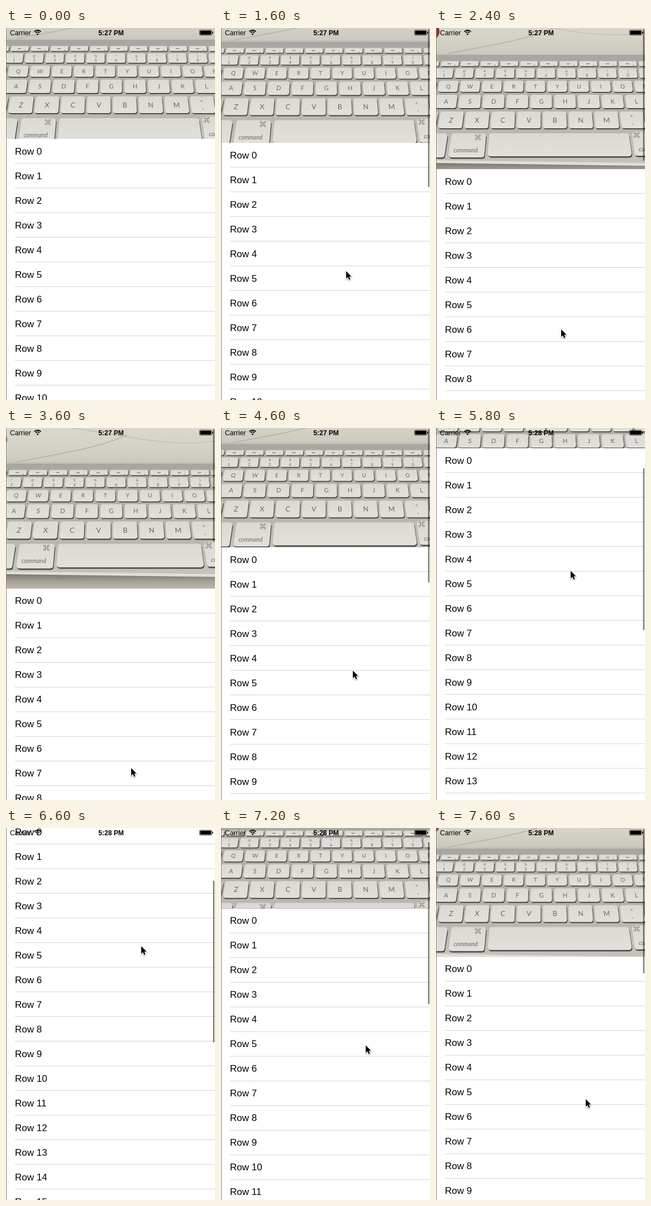
Animation, 374 px wide and 664 px high, one loop 7800 ms. Source, as an HTML page with a canvas:

```html
<!DOCTYPE html>
<html lang="en">
<head>
<meta charset="utf-8">
<title>Stretchy table header</title>
<style>
  html, body { margin: 0; width: 100%; height: 100%; overflow: hidden; background: #fff; }
  canvas { display: block; width: 374px; height: 664px; }
</style>
</head>
<body>
<canvas id="stage" width="374" height="664"></canvas>
<script>
const W = 374, HGT = 664, LOOP = 7800, STEP = 200;
const REST = 198, ROW = 44, PHOTO_H = 280;
const SANS = '"Liberation Sans", Arial, sans-serif';
const KEY_FONT = 'Lato, "Open Sans", sans-serif';
const ctx = document.getElementById('stage').getContext('2d');

// time, pointer x, pointer y, header height
const drag = [
  [200, 250, 520, 198], [800, 224, 420, 198], [1200, 224, 434, 205],
  [1600, 224, 434, 205], [2400, 224, 538, 252], [3600, 224, 607, 286.5],
  [4600, 236, 433, 213], [5800, 241, 255, 36], [6600, 242, 211, -15],
  [7600, 268, 484, 229.5]
];

function slope(i, c) {
  if (i === 0 || i === drag.length - 1) return 0;
  const rate = j => (drag[j + 1][c] - drag[j][c]) / (drag[j + 1][0] - drag[j][0]);
  const a = rate(i - 1), b = rate(i);
  return a * b > 0 ? 2 * a * b / (a + b) : 0;
}

// Monotone cubic through the drag points
function track(t, c) {
  if (t <= drag[0][0]) return drag[0][c];
  let i = 0;
  while (i < drag.length - 2 && t > drag[i + 1][0]) i++;
  const [p, q] = [drag[i], drag[i + 1]];
  const d = q[0] - p[0], s = Math.min(1, (t - p[0]) / d), s2 = s * s, s3 = s2 * s;
  return (2 * s3 - 3 * s2 + 1) * p[c] + (3 * s2 - 2 * s3) * q[c] +
    d * ((s3 - 2 * s2 + s) * slope(i, c) + (s3 - s2) * slope(i + 1, c));
}

function text(str, x, y, font, color, align = 'left') {
  ctx.font = font;
  ctx.fillStyle = color;
  ctx.textAlign = align;
  ctx.fillText(str, x, y);
}

function roundPoly(pts, r) {
  const n = pts.length, last = pts[n - 1];
  ctx.beginPath();
  ctx.moveTo((pts[0][0] + last[0]) / 2, (pts[0][1] + last[1]) / 2);
  pts.forEach((p, i) => ctx.arcTo(...p, ...pts[(i + 1) % n], r));
  ctx.closePath();
}

function gradient(y0, y1, ...colors) {
  const g = ctx.createLinearGradient(0, y0, 0, y1);
  colors.forEach((c, i) => g.addColorStop(i / (colors.length - 1), c));
  return g;
}

const lean = x => (x - 187) * 0.0009;

function keycap(x0, x1, y0, y1, r) {
  const h = (y1 - y0) / 2;
  const a = lean(x0) * h, b = lean(x1) * h;
  const quad = (dx, dy) => [
    [x0 - a + dx, y0 + dy], [x1 - b + dx, y0 + dy],
    [x1 + b + dx, y1 + dy], [x0 + a + dx, y1 + dy]
  ];
  const depth = 1.2 + h * 0.06;
  roundPoly(quad(1.1, depth), r);
  ctx.fillStyle = '#4b4943';
  ctx.fill();
  roundPoly(quad(0, 0), r);
  ctx.fillStyle = gradient(y0, y1, '#dbd9d3', '#e2e0da');
  ctx.fill();
}

function label(str, x, y, size) {
  ctx.save();
  ctx.transform(1, 0, lean(x), 1, x, y);
  text(str, 0, size * 0.36, `${size}px ${KEY_FONT}`, '#686763', 'center');
  ctx.restore();
}

// first key centre, pitch, key width, top, bottom, letter size, legends
const keyRows = [
  [22, 39, 35, 94, 114, 10, 'QWERTYUIOP'],
  [18, 42.6, 38.4, 119, 143, 11, 'ASDFGHJKL'],
  [27, 46.4, 42.4, 149, 179, 12.5, 'ZXCVBNM']
];

function commandMark(x, y) {
  ctx.strokeStyle = '#777570';
  ctx.lineWidth = 0.9;
  ctx.strokeRect(x - 1.8, y - 1.8, 3.6, 3.6);
  for (const sx of [-1, 1]) for (const sy of [-1, 1]) {
    ctx.beginPath();
    ctx.arc(x + sx * 3.4, y + sy * 3.4, 1.6, 0, 7);
    ctx.stroke();
  }
}

function desk() {
  ctx.fillStyle = gradient(-14, 48, '#dad7cd', '#d5d2c8', '#cbc8be');
  ctx.fillRect(0, -14, W, PHOTO_H);
  ctx.lineWidth = 1.3;
  ctx.strokeStyle = '#b0aca1';
  ctx.beginPath();
  ctx.moveTo(10, 48);
  ctx.bezierCurveTo(75, 34, 160, 24, 216, -2);
  ctx.stroke();
  ctx.strokeStyle = '#c2beb3';
  ctx.beginPath();
  ctx.moveTo(120, -14);
  ctx.bezierCurveTo(210, -2, 290, 22, 374, 8);
  ctx.stroke();
  ctx.fillStyle = '#91362f';
  ctx.beginPath();
  ctx.ellipse(-3, 8, 9, 12, 0.3, 0, 7);
  ctx.fill();
}

function keyboard() {
  ctx.fillStyle = gradient(46, 246, '#a8a6a0', '#b0aea8', '#b8b6af', '#c5c3bc');
  ctx.fillRect(0, 46, W, 200);
  ctx.fillStyle = '#c5c3bd';
  ctx.fillRect(0, 46, W, 2);

  for (let i = -1; i < 11; i++) {
    const x = 25 + i * 35.4;
    keycap(x - 15.8, x + 15.8, 59, 68, 2);
    ctx.fillStyle = '#8b8984';
    ctx.fillRect(x - 4, 63, 6, 1.6);
    ctx.fillRect(x + 8, 66, 3, 1);
  }

  const symbols = '!@#$%^&*()', digits = '1234567890';
  for (let i = 0; i < 11; i++) {
    const x = 14 + i * 36.6;
    keycap(x - 16.4, x + 16.4, 72, 89, 3);
    if (i < 10) {
      label(symbols[i], x, 76.5, 6);
      label(digits[i], x, 84.5, 7.5);
    }
  }

  for (const [first, pitch, width, top, bottom, size, letters] of keyRows) {
    for (let i = -1; i <= letters.length; i++) {
      const x = first + i * pitch;
      keycap(x - width / 2, x + width / 2, top, bottom, 4);
      if (letters[i]) label(letters[i], x, (top + bottom) / 2, size);
    }
  }
  label('<', 350, 157, 9);
  label(',', 352, 168, 11);

  keycap(-40, 18, 188, 231, 5);
  keycap(25, 88, 188, 231, 5);
  keycap(94, 348, 188, 229, 5);
  keycap(353, 420, 185, 228, 5);
  commandMark(75, 195);
  commandMark(359, 191);
  const small = `italic 10.5px ${KEY_FONT}`;
  text('command', 53, 222, small, '#6b6a65', 'center');
  text('command', 363, 220, small, '#6b6a65');

  // Front edge and the desk below it
  const slab = (y, fill) => {
    roundPoly([[-9, y], [383, y + 5], [383, 290], [-9, 290]], 0.1);
    ctx.fillStyle = fill;
    ctx.fill();
  };
  slab(236, '#e0ded7');
  slab(241, gradient(241, 266, '#79766d', '#a5a197', '#bab6ab'));
}

function header(h) {
  if (h <= 0) return;
  ctx.save();
  ctx.beginPath();
  ctx.rect(0, 0, W, h);
  ctx.clip();
  const zoom = Math.max(1, h / PHOTO_H);
  ctx.translate(W / 2, h / 2);
  ctx.scale(zoom, zoom);
  ctx.translate(-W / 2, -126);
  desk();
  keyboard();
  ctx.restore();
}

function rows(top) {
  for (let i = 0, y = top; y < HGT; i++, y += ROW) {
    text('Row ' + i, 16, Math.floor(y) + 28, `17px ${SANS}`, '#000');
    ctx.fillStyle = '#d5d4d7';
    ctx.fillRect(16, Math.round(y) + 43, W - 16, 1);
  }
}

function scrollbar(h) {
  const top = 2 + Math.max(0, REST - h) * 0.431;
  const bottom = h > REST ? 291 - (h - REST) : top + 289;
  ctx.fillStyle = 'rgba(0,0,0,.5)';
  ctx.beginPath();
  ctx.roundRect(370.5, top, 2.5, bottom - top, 1.2);
  ctx.fill();
}

function statusBar(clock) {
  text('Carrier', 7, 13, `12.3px ${SANS}`, '#000');
  text(clock, 188, 13, `bold 12.1px ${SANS}`, '#000', 'center');
  ctx.strokeStyle = '#000';
  ctx.lineWidth = 1.8;
  for (const r of [4.8, 8]) {
    ctx.beginPath();
    ctx.arc(56.5, 12, r, -Math.PI * 0.76, -Math.PI * 0.24);
    ctx.stroke();
  }
  ctx.fillStyle = '#000';
  ctx.beginPath();
  ctx.moveTo(56.5, 13);
  ctx.arc(56.5, 12.5, 2.6, -Math.PI * 0.76, -Math.PI * 0.24);
  ctx.fill();
  ctx.lineWidth = 0.8;
  ctx.beginPath();
  ctx.roundRect(346.4, 3.9, 21.6, 8.8, 1.5);
  ctx.stroke();
  ctx.fillRect(347.5, 5, 19.4, 6.6);
  ctx.fillRect(369, 6.5, 1.4, 3.6);
}

function pointer(x, y) {
  ctx.save();
  ctx.translate(x, y);
  ctx.beginPath();
  [[0, 0], [0, 13.4], [3.1, 10.6], [5.2, 15.4], [7.5, 14.4], [5.4, 9.8], [9.4, 9.6]]
    .forEach(p => ctx.lineTo(...p));
  ctx.closePath();
  ctx.shadowColor = 'rgba(0,0,0,.4)';
  ctx.shadowBlur = 2;
  ctx.shadowOffsetY = 1;
  ctx.lineWidth = 2;
  ctx.strokeStyle = '#fff';
  ctx.stroke();
  ctx.shadowColor = 'transparent';
  ctx.fillStyle = '#000';
  ctx.fill();
  ctx.restore();
}

function draw(t) {
  // Half-point positions, as on a 2x display
  const h = Math.round(track(t, 3) * 2) / 2;
  ctx.fillStyle = '#fff';
  ctx.fillRect(0, 0, W, HGT);
  header(h);
  rows(h);
  if (t >= 1000) scrollbar(h);
  statusBar(t < 5200 ? '5:27 PM' : '5:28 PM');
  ctx.fillStyle = '#858585';
  ctx.fillRect(0, 0, 1, HGT);
  if (t >= 200) pointer(Math.round(track(t, 1)), Math.round(track(t, 2)));
}

const start = performance.now();
let shown = -1;
function tick() {
  const t = Math.floor((performance.now() - start) % LOOP / STEP) * STEP;
  if (t !== shown) draw(shown = t);
  requestAnimationFrame(tick);
}
tick();
</script>
</body>
</html>
```
